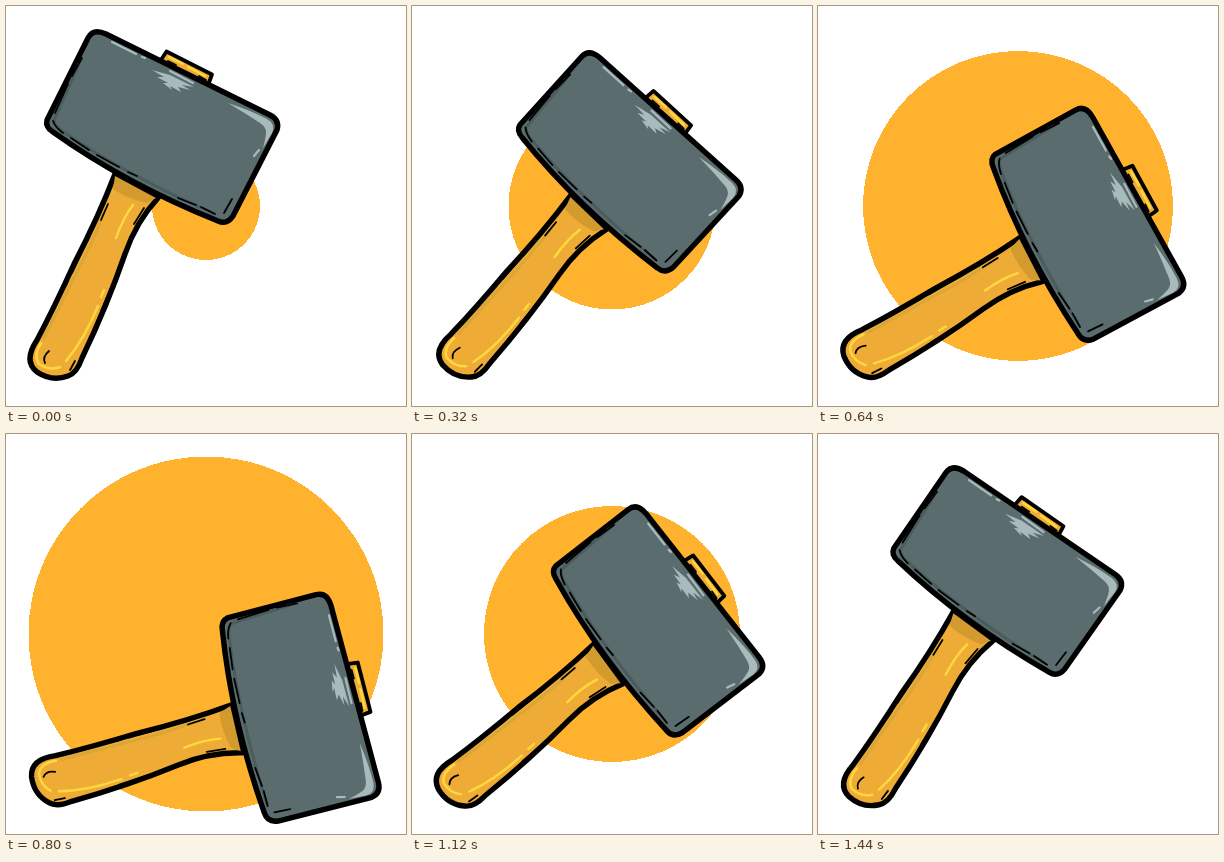
Recreate the animation shown at these times as an HTML page. Size 400x400 px, loop 1600 ms.

```html
<!DOCTYPE html>
<html lang="en">
<head>
<meta charset="utf-8">
<title>Hammer</title>
<style>
  html, body { margin: 0; width: 100%; height: 100%; overflow: hidden; background: #fff; }
  svg { display: block; width: 100vw; height: 100vh; }
  path { stroke-linecap: round; stroke-linejoin: round; }
  .ink { stroke: #000; stroke-width: 5.4; }
  .wood { fill: #eeac36; }
  .line { fill: none; stroke: #000; stroke-width: 1.8; }
  .gold { fill: none; stroke: #ffd83f; stroke-width: 2.4; }
  .shine { fill: none; stroke: #a9babd; stroke-width: 2.2; }
</style>
</head>
<body>
<svg viewBox="0 0 400 400">
  <circle id="disc" cx="200" cy="200" fill="#ffb22d" shape-rendering="crispEdges"/>
  <!-- drawn upright-left; the group turns about the butt of the handle -->
  <g id="hammer">
    <path class="ink wood" d="M109 168Q92 212 68 258Q48 302 31 334Q17 355 31 366Q46 376 62 370Q71 367 76 352Q101 300 119 248Q130 216 152 192Z"/>
    <path fill="#d39a2e" d="M109 170L150 192L141 197Q122 193 107 183Z"/>
    <path fill="none" stroke="#d9a637" stroke-width="3" d="M98 207Q86 238 70 268Q52 304 38 332"/>
    <path class="gold" d="M127 199Q117 212 110 232M35 337Q27 350 33 358Q43 365 54 361M60 355Q78 334 92 300M95 291L98 284"/>
    <path class="line" d="M102 198L95 214M84 229L66 267M62 275L58 283M43 345Q36 351 39 357M107 277L95 305M64 364L69 355M138 202L128 218"/>

    <path class="wood" stroke="#000" stroke-width="3.8" d="M160.500 45.500L206 68.500L201 82L151 60Z"/>
    <path class="gold" d="M163 51L177 58M182 61L199 70"/>
    <path class="line" d="M162 55L170 59M193 70L200 74"/>

    <path class="ink" fill="#5a6c6e" d="M82 32Q87 22 100 28L264 109Q274 114 271 124L227 210Q221 219 212 215Q120 178 47 126Q39 121 41 114Z"/>
    <path fill="none" stroke="#4b5c5e" stroke-width="3" d="M73 58L48 114Q48 120 56 125Q122 170 207 207"/>
    <path class="line" d="M76 52L66 70M62 78L49 107M47 115Q49 121 57 127M65 132L83 144M91 149L113 161M122 166L131 170M172 192L190 199M195 201L209 208M218 207L226 193"/>
    <path class="shine" d="M106 36L130 48M136 51L139 52"/>
    <path fill="#a9babd" d="M146 64L164 69L188 81L176 79L184 84L172 81L175 86L164 80L166 84L157 77L162 77L151 71L158 71ZM222 97Q246 105 261 113Q270 118 266 127L257 142Q260 131 260 126Q260 121 254 117Q239 107 222 97Z"/>
    <path class="shine" d="M253 144L248 150M164 65L187 77"/>
  </g>
</svg>
<script>
const STEP = 160;
// [turn in degrees, butt x, butt y, disc radius] for each pose of the swing
const poses = [
  [0, 48, 349, 54],
  [8, 50, 348, 0],
  [15.6, 51.5, 347, 103.5],
  [25.5, 49, 347, 128],
  [34.6, 49.5, 345.7, 155],
  [48.7, 49.5, 344.3, 177.5]
];
const disc = document.getElementById('disc');
const hammer = document.getElementById('hammer');

function draw(now) {
  const step = Math.floor(now / STEP) % 10;
  const [turn, x, y, radius] = poses[Math.min(step, 10 - step)];
  disc.setAttribute('r', radius);
  hammer.setAttribute('transform', `translate(${x} ${y}) rotate(${turn}) translate(-48 -349)`);
}

const start = performance.now();
function tick() {
  draw(performance.now() - start);
  requestAnimationFrame(tick);
}
tick();
</script>
</body>
</html>
```
